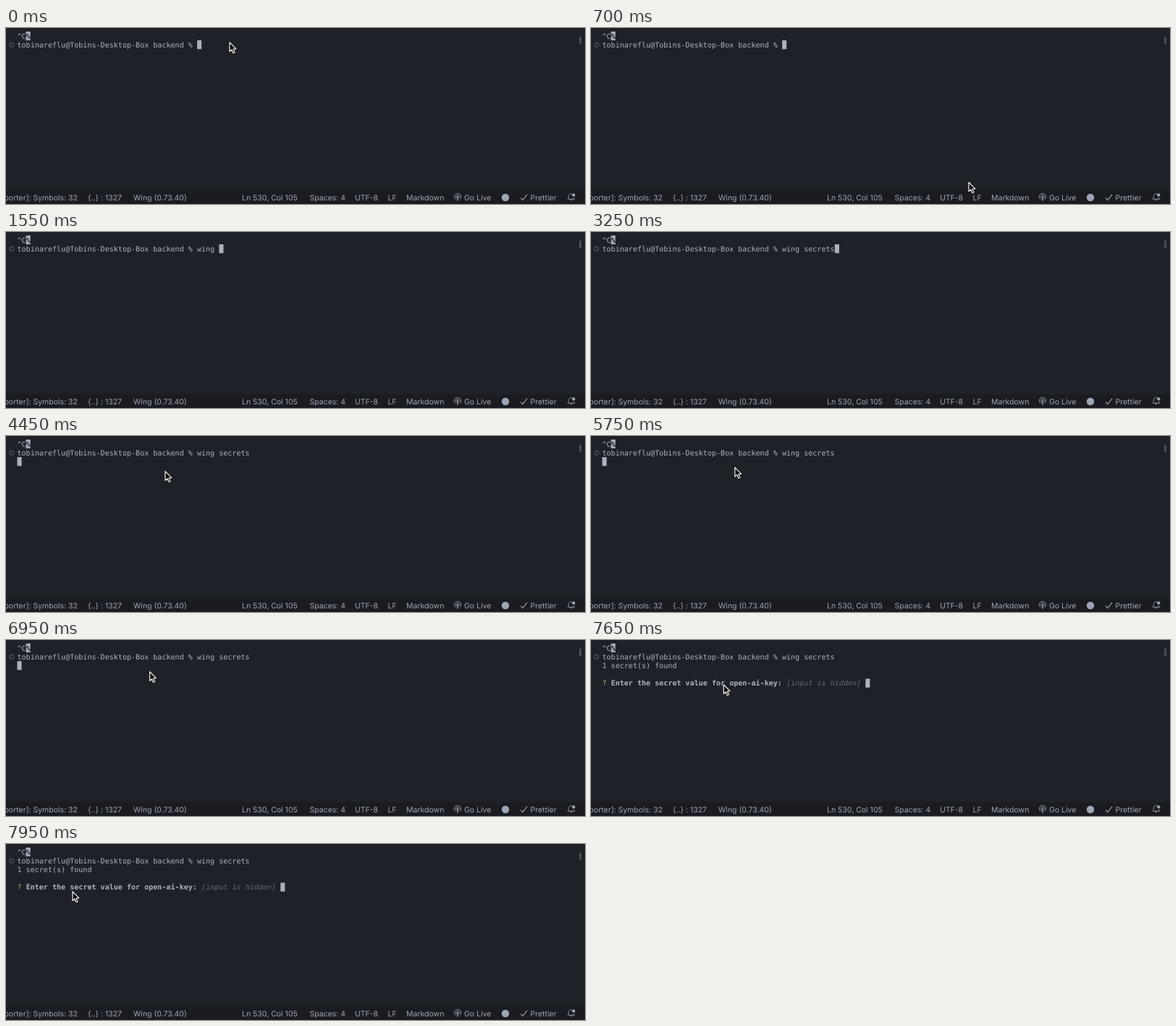
Animation of 800 by 244 pixels, one loop 8 s. Source, as an HTML page with a canvas:

```html
<!DOCTYPE html>
<html lang="en">
<head>
<meta charset="utf-8">
<title>Terminal session</title>
<style>
  html, body { margin: 0; width: 100%; height: 100%; overflow: hidden; background: #1e2128; }
  canvas { display: block; }
</style>
</head>
<body>
<canvas id="stage" width="800" height="244"></canvas>
<script>
const ctx = document.getElementById('stage').getContext('2d');
const LOOP = 8000, STEP = 50;

const BG = '#1e2128', BAR = '#1a1c22', FG = '#abb2bf', BAR_FG = '#9da5b4';
const DIM = '#626873', GREEN = '#8cc265';

const FONT = 10.07, CELL = FONT * 0.6021, LINE = 12.2, LEFT = 15.5, TOP = 4.9;
const MONO = '"DejaVu Sans Mono", monospace';
const SANS = 'Inter, Roboto, sans-serif';

const PROMPT = 'tobinareflu@Tobins-Desktop-Box backend % ';
const COMMAND = 'wing secrets';
const KEY_TIMES = [1050, 1150, 1350, 1450, 1550, 1850, 2050, 2250, 2500, 2600, 2850, 3250];
const ENTER = 3700, FOUND = 7200, ASK = 7250;

// Pointer paths: [time, x, y] of the tip
const PATHS = [
  { from: 0, to: 1050, keys: [[250, 309, 20], [400, 372, 88], [600, 518, 210], [700, 522, 214],
    [850, 400, 130], [1000, 287, 59]] },
  { from: 4250, to: LOOP, keys: [[4250, 286, 59], [4350, 252, 58], [4450, 220, 49], [4550, 208, 36.5],
    [4900, 208, 36.5], [5250, 203, 39], [5650, 199, 43.5], [5950, 198.6, 44],
    [7600, 198.6, 44], [7700, 168, 80], [7800, 122, 100], [7900, 96, 77], [7950, 92, 66]] }
];

const col = n => LEFT + n * CELL;
const row = n => TOP + n * LINE;

function type(text, c, r, color = FG, style = '') {
  ctx.font = `${style} ${FONT}px ${MONO}`;
  ctx.fillStyle = color;
  ctx.fillText(text, col(c), row(r) + 9.7);
}

function block(c, r) {
  ctx.fillStyle = FG;
  ctx.fillRect(col(c), row(r), CELL, LINE);
}

function stroke(color, width, trace) {
  ctx.strokeStyle = color;
  ctx.lineWidth = width;
  ctx.beginPath();
  trace();
  ctx.stroke();
}

function polyline(points) {
  points.forEach(([x, y], i) => i ? ctx.lineTo(x, y) : ctx.moveTo(x, y));
}

function disc(x, y, r, color) {
  ctx.fillStyle = color;
  ctx.beginPath();
  ctx.arc(x, y, r, 0, Math.PI * 2);
  ctx.fill();
}

function pointAt(keys, t) {
  if (t <= keys[0][0]) return keys[0].slice(1);
  const i = keys.findIndex(k => k[0] > t);
  if (i < 0) return keys[keys.length - 1].slice(1);
  const [a, b] = [keys[i - 1], keys[i]];
  const u = (t - a[0]) / (b[0] - a[0]);
  return [1, 2].map(d => a[d] + (b[d] - a[d]) * u);
}

function drawPointer(t) {
  const path = PATHS.find(p => t >= p.from && t < p.to);
  if (!path) return;
  const [x, y] = pointAt(path.keys, t);
  ctx.save();
  ctx.translate(x, y);
  ctx.lineJoin = 'round';
  ctx.beginPath();
  polyline([[0, 0], [0, 12.6], [2.9, 10], [4.9, 14.7], [7, 13.8], [5, 9.2], [8.8, 8.9]]);
  ctx.closePath();
  ctx.fillStyle = '#050505';
  ctx.fill();
  ctx.strokeStyle = '#f2f2f2';
  ctx.lineWidth = 1.2;
  ctx.stroke();
  ctx.restore();
}

function drawTerminal(t) {
  type('^C', 0, 0);
  block(2, 0);
  type('%', 2, 0, BG, 'bold');
  stroke('#686d77', 1, () => ctx.arc(7.6, 23.4, 2.8, 0, Math.PI * 2));

  const typed = COMMAND.slice(0, KEY_TIMES.filter(k => k <= t).length);
  type(PROMPT + typed, 0, 1);

  if (t >= FOUND) type('1 secret(s) found', 0, 2);
  if (t >= ASK) {
    const ask = 'Enter the secret value for open-ai-key:';
    const hint = '[input is hidden]';
    const hintCol = ask.length + 3;
    type('?', 0, 4, GREEN);
    type(ask, 2, 4, FG, 'bold');
    type(hint, hintCol, 4, DIM, 'italic');
    block(hintCol + hint.length + 1, 4);
  } else if (t >= FOUND) {
    block(0, 4);
  } else if (t >= ENTER) {
    block(0, 2);
  } else {
    block(PROMPT.length + typed.length, 1);
  }

  ctx.fillStyle = '#484c55';
  ctx.fillRect(792, 12, 3, 10.5);
}

function drawBroadcast(x, y) {
  for (const r of [2.4, 4.6]) {
    stroke(BAR_FG, 0.9, () => ctx.arc(x, y, r, Math.PI * 0.72, Math.PI * 2.28));
  }
  disc(x, y, 1.1, BAR_FG);
  stroke(BAR_FG, 1.5, () => polyline([[x, y + 1], [x, y + 5.5]]));
}

function drawBell(x, y) {
  stroke(BAR_FG, 0.9, () => {
    ctx.moveTo(x + 0.8, y - 4.7);
    ctx.bezierCurveTo(x - 2.4, y - 5.3, x - 3.6, y - 2.8, x - 3.5, y);
    polyline([[x - 3.5, y], [x - 4.7, y + 2.8], [x + 4.7, y + 2.8], [x + 3.5, y + 0.4]]);
    ctx.moveTo(x - 1.4, y + 3);
    ctx.arc(x, y + 3, 1.4, Math.PI, 0, true);
  });
  disc(x + 3.2, y - 3, 2.2, BAR_FG);
}

function drawStatusBar() {
  ctx.fillStyle = BAR;
  ctx.fillRect(0, 225, 800, 19);
  ctx.font = `10.5px ${SANS}`;
  ctx.fillStyle = BAR_FG;
  const base = 238.6;
  ctx.textAlign = 'right';
  ctx.fillText('porter]: Symbols: 32', 99, base);
  ctx.textAlign = 'left';
  const items = [
    ['{..} : 1327', 113], ['Wing (0.73.40)', 176], ['Ln 530, Col 105', 326], ['Spaces: 4', 419.5],
    ['UTF-8', 482], ['LF', 527.5], ['Markdown', 553], ['Go Live', 633], ['Prettier', 724.5]
  ];
  for (const [text, x] of items) ctx.fillText(text, x, base);

  drawBroadcast(624, 234);
  disc(690, 235, 5.2, BAR_FG);
  stroke(BAR_FG, 1.1, () => polyline([[711, 235.6], [713.9, 238.7], [720, 230.8]]));
  drawBell(781, 234.4);
}

function draw(t) {
  ctx.textRendering = 'geometricPrecision';
  ctx.fillStyle = BG;
  ctx.fillRect(0, 0, 800, 244);
  drawTerminal(t);
  drawStatusBar();
  drawPointer(t);
}

const start = performance.now();
function tick() {
  const t = (performance.now() - start) % LOOP;
  draw(Math.floor(t / STEP) * STEP);
  requestAnimationFrame(tick);
}
tick();
</script>
</body>
</html>
```
